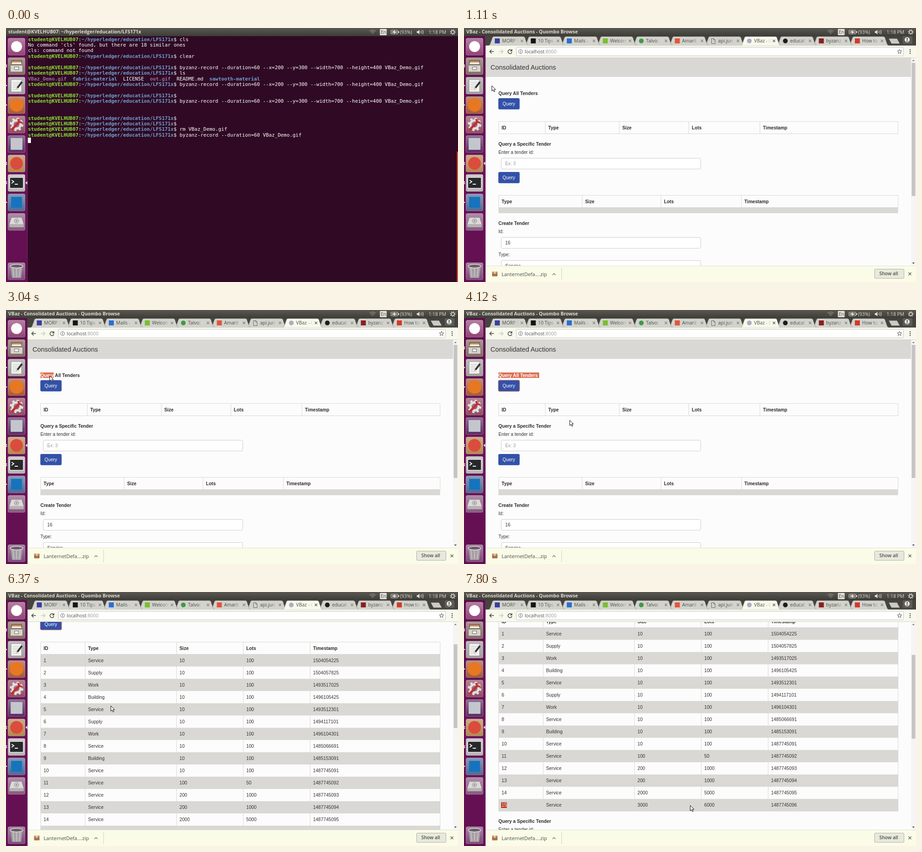
An HTML page for the animation above (8000 ms loop, 998 by 561 pixels).

```html
<!DOCTYPE html>
<html lang="en">
<head>
<meta charset="utf-8">
<title>Tender desk demo</title>
<style>
html, body { margin: 0; width: 100%; height: 100%; overflow: hidden; background: #300a24; }
svg { display: block; width: 100vw; height: 100vh; }
text { white-space: pre; font: 10.23px "Liberation Sans", Arial, sans-serif; fill: #333; }
.b { font-weight: 700; fill: #2b2b2b; }
.h1 { font-size: 14.61px; }
.btn { fill: #fff; }
.mono { font: 10.914px "DejaVu Sans Mono", monospace; fill: #fff; }
.usr { font-weight: 700; fill: #8ae234; }
.dir { font-weight: 700; fill: #729fcf; }
.img { font-weight: 700; fill: #9d6a9b; }
.ui { font: 10.4px "Open Sans", "Noto Sans", sans-serif; fill: #4c4c48; }
.bar { font: 700 10.5px "Open Sans", "Noto Sans", sans-serif; fill: #dfdbd2; }
.light { fill: #dfdbd2; }
.file { font-size: 11px; }
.semi { font-weight: 600; }
.hint { fill: #999; }
.sel { fill: #fff; }
</style>
</head>
<body>
<svg viewBox="0 0 998 561" preserveAspectRatio="none">
  <defs>
    <linearGradient id="panel" x2="0" y2="1"><stop stop-color="#5a5850"/><stop offset="1" stop-color="#3d3c38"/></linearGradient>
    <linearGradient id="dock" x2="0" y2="1"><stop stop-color="#5a1049"/><stop offset=".5" stop-color="#6a1257"/><stop offset="1" stop-color="#620f50"/></linearGradient>
    <linearGradient id="gloss" x2="0" y2="1"><stop stop-color="#fff" stop-opacity=".35"/><stop offset="1" stop-color="#fff" stop-opacity=".04"/></linearGradient>
    <linearGradient id="fade"><stop stop-color="#d3d3cd" stop-opacity="0"/><stop offset="1" stop-color="#d3d3cd"/></linearGradient>
    <linearGradient id="fadeOn"><stop stop-color="#f8f9ed" stop-opacity="0"/><stop offset="1" stop-color="#f8f9ed"/></linearGradient>
    <clipPath id="view"><path d="M47 66H987V525H47Z"/></clipPath>
  </defs>
  <g id="terminal"></g>
  <g id="browser">
    <path fill="#fcfcfc" d="M47 66H998V525H47Z"/>
    <g clip-path="url(#view)"><g id="page"></g></g>
    <g id="chrome"></g>
  </g>
  <g id="desktop"></g>
  <path id="pointer" d="M.5 .5V12.2L3.3 9.6 5.3 14 7.2 13.1 5.2 8.9H8.9Z" fill="#fff" stroke="#111"/>
</svg>
<script>
const $ = id => document.getElementById(id);
const text = (x, y, s, cls = '', id = '') => `<text x="${x}" y="${y + 3.7}" class="${cls}"${id && ` id="${id}"`}>${s}</text>`;
const span = (cls, s, id = '') => `<tspan class="${cls}"${id && ` id="${id}"`}>${s}</tspan>`;
const rect = (x, y, w, h, fill, extra = '') => `<rect x="${x}" y="${y}" width="${w}" height="${h}" fill="${fill}" ${extra}/>`;
const dot = (x, y, r, fill, extra = '') => `<circle cx="${x}" cy="${y}" r="${r}" fill="${fill}" ${extra}/>`;
const fill = (d, color) => `<path d="${d}" fill="${color}"/>`;
const line = (d, color, w = 1) => `<path d="${d}" fill="none" stroke="${color}" stroke-width="${w}"/>`;
const group = (id, s) => `<g id="${id}">${s}</g>`;

// Terminal window
const record = 'byzanz-record --duration=60 --x=200 --y=300 --width=700 --height=400 VBaz_Demo.gif';
const home = '~/hyperledger/education/LFS171x';
const host = 'student@KVELHUB07';
const prompt = cmd => span('usr', host) + ':' + span('dir', home) + '$ ' + cmd;
const listing = [span('img', 'VBaz_Demo.gif'), span('dir', 'fabric-material'), 'LICENSE',
  span('img', 'out.gif'), 'README.md', span('dir', 'sawtooth-material')].join('  ');
const shell = [prompt('cls'), "No command 'cls' found, but there are 18 similar ones", 'cls: command not found',
  prompt('clear'), '', prompt(record), prompt('ls'), listing, prompt(record), '', prompt(''), prompt(record),
  '', '', prompt(''), prompt(''), prompt('rm VBaz_Demo.gif'), prompt('byzanz-record --duration=60 VBaz_Demo.gif')];
$('terminal').innerHTML = rect(47, 18, 951, 543, '#300a24')
  + shell.map((s, i) => text(48.4, 24.9 + 12.43 * i, s, 'mono')).join('')
  + rect(48.3, 242, 6.7, 12, '#fff') + rect(995.6, 273, 2.4, 288, '#d9572f');

// Web page
const GREY = '#d9d8d4', RULE = '#d9d8d5', SELECT = '#db6e50';
const ROW = 27.04;

function table(cols, head, rows, y) {
  const end = cols.length - 1, h = ROW * (rows.length + 1);
  const cells = (row, cy, cls) => row.map((s, i) => text(cols[i] + 6.5, cy, s, cls)).join('');
  const body = rows.map((row, i) => {
    const top = y + ROW * (i + 1);
    return (i % 2 ? '' : rect(cols[0], top, cols[end] - cols[0], ROW, GREY)) + cells(row, top + 13.5, '');
  }).join('');
  return body + cells(head, y + 13.5, 'b')
    + line(cols.map(x => `M${x} ${y}v${h}`).join('') + [0, ROW, h].map(d => `M${cols[0]} ${y + d}H${cols[end]}`).join(''), RULE);
}
const field = (y, s, cls) => rect(82.3, y + .5, 440.4, 24, '#fff', 'stroke="#ccc" rx="3"') + text(91, y + 12.5, s, cls);
const button = (y, id) => rect(75.8, y, 47, 24.8, '#3351a8', `rx="3" id="${id}"`) + text(85, y + 12.5, 'Query', 'btn');

const types = 'Service Supply Work Building Service Supply Work Service Building'.split(' ');
const stamps = [1504054225, 1504057825, 1493517025, 1496105425, 1493512301, 1494117101, 1496104301, 1485066691, 1485153091];
const bigLots = [[100, 50], [200, 1000], [200, 1000], [2000, 5000], [3000, 6000]];
const tenders = Array.from({ length: 15 }, (_, i) =>
  [i === 14 ? span('', 15, 'lastId') : i + 1, types[i] || 'Service', ...(bigLots[i - 10] || [10, 100]), stamps[i] || 1487745082 + i]);
const fields = ['ID', 'Type', 'Size', 'Lots', 'Timestamp'];

$('page').innerHTML = rect(47, 66, 940, 42, GREY)
  + rect(58, 79, 90, 16, SELECT, 'id="markWord"') + rect(147.5, 79, 56.5, 16, SELECT, 'id="markTitle"')
  + text(58.5, 88.4, span('', 'Consolidated ', 'word') + span('', 'Auctions', 'title'), 'h1')
  + rect(76, 138, 29, 12, SELECT, 'id="markQuery"') + rect(104.5, 138, 61.5, 12, SELECT, 'id="markLabel"')
  + text(76, 144, span('b', 'Query', 'query') + span('b', ' All Tenders', 'label'), 'b')
  + button(155, 'send')
  + group('empty', table([76.5, 179.5, 343, 496.5, 653.5, 958.5], fields, [], 206.5))
  + group('filled', rect(76.5, 206.5, 882, ROW * 16, '#fcfcfc')
    + table([76.5, 174.8, 376.5, 524, 671.5, 958.5], fields, tenders, 206.5))
  + group('rest', text(76, 256, 'Query a Specific Tender', 'b') + text(76, 274, 'Enter a tender id:')
    + field(287, 'Ex: 3', 'hint') + button(318, 'find')
    + table([76.5, 261, 435, 612.5, 958.5], fields.slice(1), [], 369.5) + rect(76, 396.5, 882.5, 12.5, GREY)
    + text(76, 431, 'Create Tender', 'b') + text(76, 449.5, 'Id:') + field(462, '16')
    + text(76, 500.5, 'Type:') + field(513, 'Service'));
$('lastId').closest('text').insertAdjacentHTML('beforebegin', rect(82, 206.5 + 15 * ROW + 7.4, 12.5, 12.5, '#bd3022', 'id="markId"'));

// Browser frame
const tabs = [['MORP S', '#3a3f9f'], ['10 Tips', '#151515'], ['Mails -', '#2a6fd0'], ['Welcom', '#76c02f'],
  ['Talvo:', '#3f9a43'], ['Amaril', '#e2553c'], ['api.jun', ''], ['VBaz - C', '#a9b1bd'],
  ['educat', '#1c1c1c'], ['byzanz', '#8a1f1f'], ['How to', '#d5382d']];
const roundIcons = [4, 7, 8];
const cross = (x, y, r, color) => line(`M${x - r} ${y - r}l${2 * r} ${2 * r}m0 ${-2 * r}l${-2 * r} ${2 * r}`, color, 1.2);
function tab([name, color], i) {
  const x = 54 + 79.5 * i, on = i === 7, cx = x + 19.5, back = on ? '#f8f9ed' : '#d3d3cd';
  const icon = !color ? line(`M${cx - 4} 23.5h5l3 3v8h-8zm5 0v3h3`, '#666')
    : roundIcons.includes(i) ? dot(cx, 28.5, 5.2, color) : rect(cx - 5.5, 23, 11, 11, color);
  return `<path d="M${x} 39q3-1 4-4l5-14q1-2 3-2h65q2 0 3 2l5 14q1 3 4 4z" fill="${back}" stroke="#8d8c85" stroke-width=".7"/>`
    + icon + text(x + 30, 28.6, name, 'ui') + rect(x + 52, 21, 16, 16, `url(#${on ? 'fadeOn' : 'fade'})`)
    + rect(x + 67.5, 21, 13, 16, back) + cross(x + 74, 28.5, 2.6, on ? '#444' : '#77766f');
}
const order = [...tabs.keys()].filter(i => i !== 7).reverse().concat(7);
$('chrome').innerHTML = rect(47, 18, 951, 21, '#45443f') + order.map(i => tab(tabs[i], i)).join('')
  + fill('M938 23.5h18l6 11h-18z', '#cbcac4')
  + rect(969, 18, 21, 17, '#5d5c56', 'rx="2"') + dot(978.5, 26, 5.5, '#f2f2ee')
  + dot(978.5, 24.3, 1.8, '#4a4944') + fill('M975 29.5q3.5-4 7 0z', '#4a4944')
  + rect(47, 38.7, 951, 27.3, '#f8f9ed') + line('M47 65.5H998', '#d4d5c9')
  + line('M66 52H57m4-4.3L56.7 52 61 56.3', '#444', 1.5) + line('M77 52h9m-4-4.3L86.3 52 82 56.3', '#c9c9c0', 1.5)
  + line('M105 49.5a4.4 4.4 0 1 0 .8 3.8', '#444', 1.5) + fill('M106.5 46.5v5h-5z', '#444')
  + rect(115.5, 42.5, 855, 19, '#fff', 'stroke="#c3c3ba" rx="2"')
  + dot(125, 52, 4.3, 'none', 'stroke="#666"') + line('M125 51v3.5M125 49v1.2', '#666', 1.2)
  + text(134, 52, 'localhost' + span('hint', ':8000'), 'ui')
  + line('M961.7 47l1.4 3.2 3.5.3-2.7 2.3.9 3.5-3.1-1.9-3.1 1.9.9-3.5-2.7-2.3 3.5-.3z', '#555')
  + [48, 52, 56].map(y => dot(985, y, 1.2, '#444')).join('')
  + rect(987, 66, 11, 459, '#f5f5f5') + rect(988.5, 77, 8, 294, '#c4c4c4', 'id="thumb"')
  + fill('M989.5 73l2.8-3 2.8 3z', '#777') + fill('M989.5 518l2.8 3 2.8-3z', '#444')
  + rect(47, 525, 951, 36, '#fafce8') + line('M47 525.5H998', '#e1e2d4')
  + rect(62, 538, 12, 10.5, '#a9714b', 'rx="1.5"') + rect(62, 538, 12, 4, '#c99068', 'rx="1"') + rect(66.5, 538, 3, 5, '#ead7b8')
  + text(83, 544, 'LanternetDefa….zip', 'ui file') + line('M195.5 545.5l3.3-3.3 3.3 3.3', '#666', 1.2)
  + line('M215.5 530V557', '#d2d3c5')
  + rect(906.5, 532.5, 65, 20.5, '#e8e9dc', 'stroke="#aeaea4" rx="2"') + text(917, 542.7, 'Show all', 'ui semi')
  + cross(984.5, 543, 3, '#555');

// Panel and launcher, shared by both windows
const tile = (cy, color, icon) => rect(4.5, cy - 18.5, 37.5, 37.5, color, 'rx="3"')
  + rect(4.5, cy - 18.5, 37.5, 37.5, 'url(#gloss)', 'rx="3" stroke="#fff" stroke-opacity=".3"')
  + `<g transform="translate(23.3 ${cy})">${icon}</g>`;
const drawer = rect(-12, -13, 24, 12, '#6f6a62') + fill('M-10-11H10V-7H-10z', '#e08a4c') + fill('M-10-8H10L11-4H-11z', '#eeeae2')
  + rect(-13.5, -2, 27, 15, '#d8d5ce', 'rx="1.5" stroke="#77716a"') + rect(-4.5, 2, 9, 6, '#f5f3ee', 'stroke="#66615b"');
const notes = rect(-12, -13, 23, 27, '#f4f4f2', 'stroke="#999"') + line('M-9-7H8M-9-3H5M-9 1H2M-9 5H0M-9 9H5', '#bbb')
  + line('M12-8L2 5', '#333', 4) + fill('M.5 3.5L3.5 6-1 8z', '#c9a26a');
const tools = dot(0, 0, 9, 'none', 'stroke="#e0e0e0" stroke-width="5"')
  + dot(0, 0, 13, 'none', 'stroke="#e0e0e0" stroke-width="4" stroke-dasharray="5 5.2"')
  + line('M-11 12L7-7', '#c02f35', 5) + line('M4-12q-1 7 8 8', '#c02f35', 4);
const consoleIcon = rect(-15, -12, 30, 24, '#26282a', 'rx="1.5" stroke="#eee" stroke-width="1.5"')
  + line('M-11-6l5 3.5-5 3.5M-4 3H3', '#fff', 1.8);
const disk = fill('M-11-9H11L16 6H-16z', '#dcdad9') + rect(-16, 5, 32, 7, '#b5b2b2', 'rx="1"')
  + dot(0, -2, 5, '#c7c5c5', 'stroke="#999"') + dot(0, -2, 1.5, '#888');
const bin = fill('M-13-11H13L10 15H-10z', '#a79fa5') + line('M-8-7L-6 13M0-7V13M8-7L6 13', '#d0cace', 1.5)
  + '<ellipse cy="-11" rx="14" ry="4" fill="#6a5d66" stroke="#ddd8dc" stroke-width="1.5"/>';
const apps = [['#8f3b72', dot(0, 0, 12, '#fff')], ['#80645c', drawer], ['#9b9a98', notes], ['#9c5530', dot(0, 0, 15, '#e87722')],
  ['#8c4558', tools], ['#51265a', rect(-13, -13, 26, 26, '#c4c6ce')], ['#b08348', dot(0, 0, 14, '#db4c3d')],
  ['#b3afaf', consoleIcon], ['#48658f', rect(-12, -12, 24, 24, '#1673bd')], ['#84527a', disk]];
const ticks = [82, 85.5, 127, 170, 297.5, 301, 340, 343.5, 385];
const arrow = (id, cy) => `<path id="${id}" d="M47 ${cy - 4}V${cy + 4}L43 ${cy}z" fill="#e8dfe5"/>`;

$('desktop').innerHTML = rect(0, 18, 47.5, 543, 'url(#dock)') + line('M47 18V561', '#7a3a6c', .8)
  + apps.map(([color, icon], i) => tile(41 + 43 * i, color, icon)).join('') + tile(537, '#764372', bin)
  + ticks.map(y => fill(`M0 ${y - 1.8}L3 ${y} 0 ${y + 1.8}z`, '#efe6ec')).join('')
  + arrow('onBrowser', 299) + arrow('onTerminal', 342)
  + rect(0, 0, 998, 18, 'url(#panel)')
  + text(5, 8.5, `${host}: ${home}`, 'bar', 'shellTitle')
  + text(5, 8.5, 'VBaz - Consolidated Auctions - Quombo Browse', 'bar', 'webTitle')
  + line('M802.5 7q7-5 14 0M805 9.5q4.5-3.5 9 0M807.5 12q2-1.5 4 0', '#8f8c84', 1.3)
  + rect(825.5, 2, 15, 14, '#e4e0d8', 'rx="1.5"') + text(827.5, 9, 'En', 'ui')
  + rect(850, 5, 15, 8, 'none', 'stroke="#dfdbd2" rx="1"') + rect(866, 7, 2, 4, '#dfdbd2') + rect(852, 7, 11, 4, '#a9a69e')
  + fill('M858.5 4l-4 5.5h3l-1 4.5 4-5.5h-3z', '#fff') + text(870, 8.8, '(93%)', 'ui light')
  + fill('M907 7h2.5l3.5-3v10l-3.5-3H907z', '#dfdbd2') + line('M915 6.5q2 2.5 0 5M917.5 5q3 4 0 8M920 4q3.5 5 0 10', '#dfdbd2')
  + text(933, 8.8, '1:18 PM', 'ui light')
  + dot(986.5, 9, 3.3, 'none', 'stroke="#dfdbd2" stroke-width="1.5"')
  + dot(986.5, 9, 5.2, 'none', 'stroke="#dfdbd2" stroke-width="1.8" stroke-dasharray="1.7 2.384"');

// Motion
const trail = [[700, 532, 259], [1110, 61, 127], [1510, 100, 84], [2330, 100, 84], [2770, 96, 145], [3370, 96, 145],
  [3620, 94, 164], [3840, 94, 164], [4120, 233, 243], [6240, 233, 243], [6520, 229, 261], [6850, 100, 474],
  [7000, 100, 474], [7120, 88, 467], [7590, 88, 467], [7800, 499, 471]];

function pointerAt(t) {
  const next = trail.findIndex(p => p[0] > t);
  if (next < 1) return trail.at(next).slice(1);
  const [a, b] = [trail[next - 1], trail[next]];
  const p = (t - a[0]) / (b[0] - a[0]), ease = p * p * (3 - 2 * p);
  return [1, 2].map(k => Math.round(a[k] + (b[k] - a[k]) * ease));
}
const show = (id, on) => { $(id).style.display = on ? '' : 'none'; };
const mark = (box, label, on) => { show(box, on); $(label).classList.toggle('sel', on); };

function render(t) {
  const web = t >= 180, loaded = t >= 5980, focused = t >= 3800;
  for (const id of ['browser', 'webTitle', 'onBrowser', 'pointer']) show(id, web);
  for (const id of ['terminal', 'shellTitle', 'onTerminal']) show(id, !web);

  mark('markWord', 'word', t >= 1860 && t < 2370);
  mark('markTitle', 'title', t >= 2110 && t < 2370);
  mark('markQuery', 'query', t >= 3040);
  mark('markLabel', 'label', t >= 3150);
  mark('markId', 'lastId', t >= 7590);

  const [x, y] = pointerAt(t);
  $('pointer').setAttribute('transform', `translate(${x} ${y})`);
  const hover = x > 76 && x < 123 && y > 155 && y < 180;
  $('send').setAttribute('fill', hover ? '#294186' : '#3351a8');
  $('send').setAttribute('stroke', focused ? '#d46c58' : 'none');

  show('empty', !loaded);
  show('filled', loaded);
  $('rest').setAttribute('transform', `translate(0 ${loaded ? 15 * ROW : 0})`);
  const p = Math.min(1, Math.max(0, (t - 6240) / 341));
  const scroll = Math.round(155 * (1 - (1 - p) ** 2));
  $('page').setAttribute('transform', `translate(0 ${-scroll})`);
  $('thumb').setAttribute('y', 77 + scroll * .4);
  $('thumb').setAttribute('height', loaded ? 185 : 294);
}
function tick() {
  render(performance.now() % 8000);
  requestAnimationFrame(tick);
}
tick();
</script>
</body>
</html>
```
